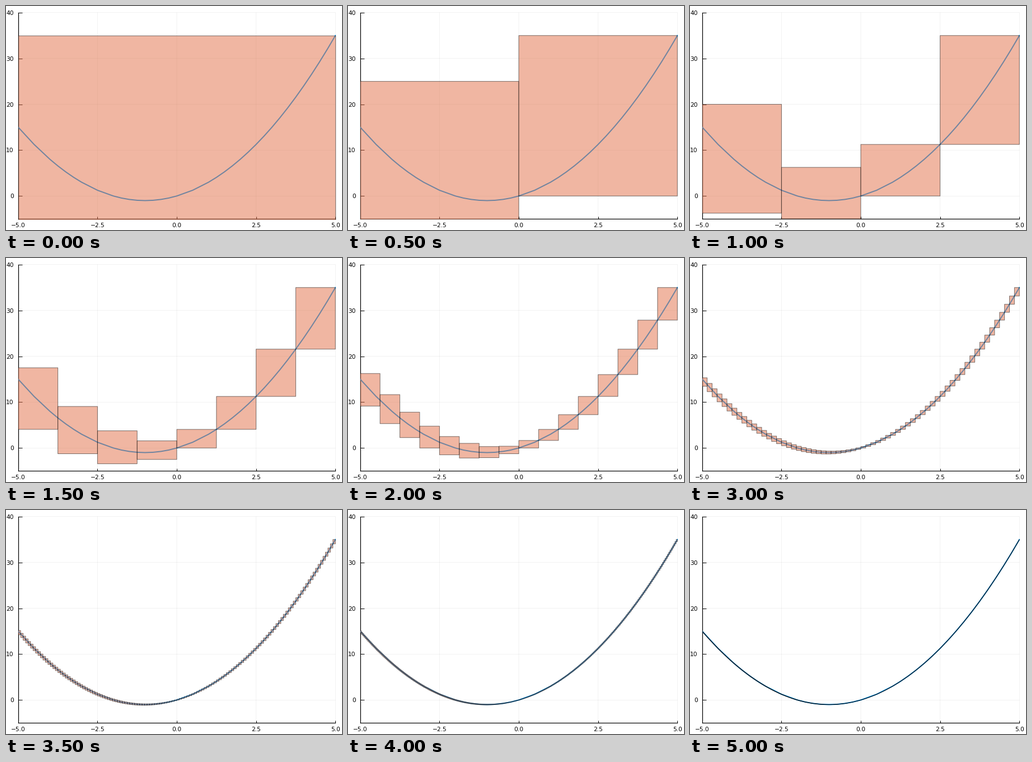
These frames come from a looping animation (600x400 px, 5.5 s). A matplotlib script:

```python
import matplotlib.pyplot as plt
import numpy as np
from matplotlib.animation import FuncAnimation
from matplotlib.collections import PolyCollection
from matplotlib.transforms import Bbox

W, H, DPI = 600, 400, 100
PX = 72 / DPI                                   # points per pixel
LEFT, RIGHT, TOP, BOTTOM = 21.8, 588.2, 11.8, 380.2
XMIN, XMAX, YMIN, YMAX = -5, 5, -5, 40
XTICKS = np.linspace(XMIN, XMAX, 5)
YTICKS = np.arange(0, YMAX + 1, 10)
STEPS = 11


def f(x):
    return x**2 + 2 * x


def enclosure(a, b):
    """Interval evaluation of x^2 + 2x, each term bounded on its own."""
    hi = max(a * a, b * b)
    lo = 0 if a <= 0 <= b else min(a * a, b * b)
    return lo + 2 * a, hi + 2 * b


def boxes(n):
    edges = np.linspace(XMIN, XMAX, n + 1)
    polys = []
    for a, b in zip(edges[:-1], edges[1:]):
        lo, hi = enclosure(a, b)
        polys.append([(a, lo), (b, lo), (b, hi), (a, hi)])
    return polys


fig = plt.figure(figsize=(W / DPI, H / DPI), dpi=DPI, facecolor="white")
ax = fig.add_axes([LEFT / W, 1 - BOTTOM / H, (RIGHT - LEFT) / W, (BOTTOM - TOP) / H])
ax.set_xlim(XMIN, XMAX)
ax.set_ylim(YMIN, YMAX)
ax.axis("off")
clip = Bbox([[22, H - 381], [589, H - 12]])


def line(xs, ys, width=1.0, color="black", **kw):
    return ax.plot(xs, ys, color=color, lw=width * PX, clip_on=False, **kw)[0]


def label(x, y, text, ha):
    fig.text(x / W, 1 - y / H, text, ha=ha, va="baseline",
             family="DejaVu Sans", size=10.67 * PX)


# grid, axes and ticks
tick_w, tick_h = 0.012 * (XMAX - XMIN), 0.012 * (YMAX - YMIN)
for x in XTICKS:
    line([x, x], [YMIN, YMAX], 0.5, alpha=0.1, zorder=1, snap=False)
    line([x, x], [YMIN, YMIN + tick_h], zorder=2, solid_capstyle="butt")
    px = LEFT + (x - XMIN) / (XMAX - XMIN) * (RIGHT - LEFT)
    label(px, 395, f"{x:.1f}".replace("-", "\u2212"), "center")
for y in YTICKS:
    line([XMIN, XMAX], [y, y], 0.5, alpha=0.1, zorder=1, snap=False)
    line([XMIN, XMIN + tick_w], [y, y], zorder=2, solid_capstyle="butt")
    py = BOTTOM - (y - YMIN) / (YMAX - YMIN) * (BOTTOM - TOP)
    label(13.9, py + 4, str(y), "right")
line([XMIN, XMAX], [YMIN, YMIN], 1.2, zorder=2)
line([XMIN, XMIN], [YMIN, YMAX], 1.2, zorder=2)

# the curve is sampled more coarsely on three unit stretches
coarse = {-5, -3, 0}
xs = np.array([x for x in np.arange(XMIN, XMAX + 0.1, 0.25)
               if (x * 2) % 1 == 0 or np.floor(x) not in coarse])
curve = line(xs, f(xs), 2.0, "#009afa", zorder=3)

cover = PolyCollection(boxes(1), facecolors="#e26f46", edgecolors="black",
                       alpha=0.5, linewidths=1.0 * PX, zorder=4)
cover.set_snap(False)
ax.add_collection(cover, autolim=False)
for artist in (curve, cover):
    artist.set_clip_on(True)
    artist.set_clip_path(None)
    artist.set_clip_box(clip)


def update(i):
    cover.set_verts(boxes(2**i))
    return (cover,)


anim = FuncAnimation(fig, update, frames=STEPS, interval=500,
                     repeat=True, repeat_delay=0, blit=False)
plt.show()
```
